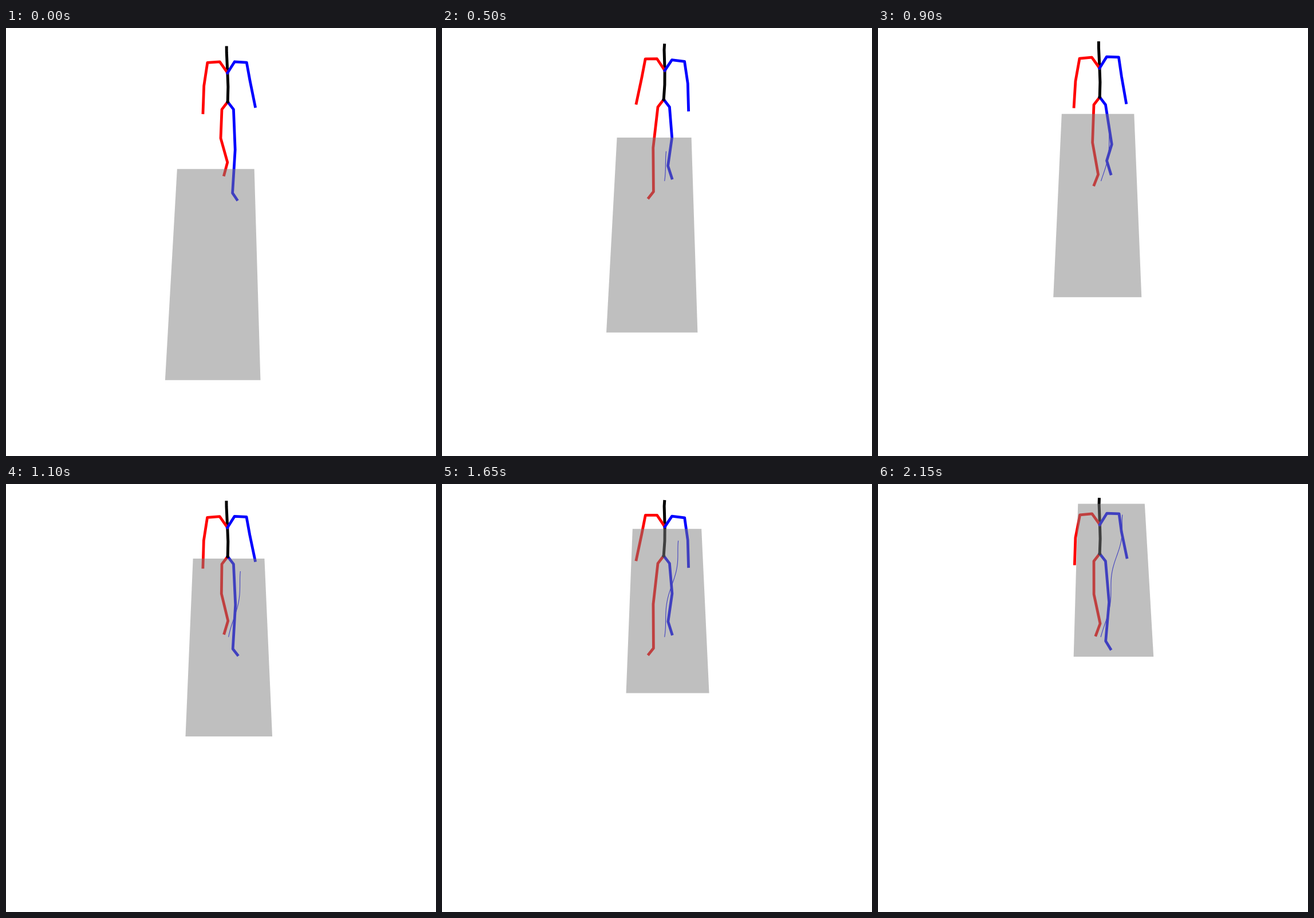
An HTML page with a canvas for the animation above (2.2 s loop, 751 px wide and 746 px high).

```html
<!DOCTYPE html>
<html lang="en">
<head>
<meta charset="utf-8">
<title>Walking figure</title>
<style>
html, body { margin: 0; width: 100%; height: 100%; overflow: hidden; background: #fff; }
canvas { display: block; }
</style>
</head>
<body>
<canvas id="stage" width="751" height="746"></canvas>
<script>
const ctx = document.getElementById('stage').getContext('2d');
const LOOP = 2200, STEP = 50, GAIT = 1140, CENTER = 387.2;
const RIGHT = -1, LEFT = 1;
const COLORS = { [RIGHT]: '#f00', [LEFT]: '#00f' };

const phaseAt = t => 2 * Math.PI * t / GAIT;

// mean + c1 cos p + s1 sin p + c2 cos 2p + s2 sin 2p + ...
const wave = (p, mean, ...coefs) => coefs.reduce((sum, c, i) => {
  const angle = p * (1 + (i >> 1));
  return sum + c * (i % 2 ? Math.sin(angle) : Math.cos(angle));
}, mean);

// The floor recedes steadily while the path drifts and sways.
const FLOOR_LENGTH = 1.221, FLOOR_HALF = 0.04315, ROOT_DEPTH = 6.297;
const depthAt = t => 6.403 + 0.000466 * t;
const sideAt = t => wave(phaseAt(t), -0.0158 + 0.00001316 * t, 0.002, -0.00094);

// Perspective: everything on the floor runs to one vanishing point.
function project(side, depth) {
  const scale = 1e4 / depth;
  return [387.8 + side * scale, scale - 1316];
}

function trace(points) {
  ctx.beginPath();
  points.forEach(p => ctx.lineTo(...p));
}
function line(color, points, width = 4.8) {
  trace(points);
  ctx.strokeStyle = color;
  ctx.lineWidth = width;
  ctx.stroke();
}

function drawTrail(t) {
  const points = [];
  for (let past = 0; past < t; past += STEP)
    points.push(project(sideAt(t) - sideAt(past), ROOT_DEPTH + depthAt(t) - depthAt(past)));
  if (points.length > 1) line('#00f', points, 1.1);
}

function drawFigure(t) {
  const phase = phaseAt(t);
  const rootY = wave(2 * phase, 125.5, 3.2, 4.6);
  const chestX = wave(phase, 388, 0, 1.8, 0, 0, -1.1);
  const headX = wave(phase, 386.9, 0.5, 3.2, 0, 0, -2.2);
  const tilt = wave(phase, 1.6, -1.75, 3.7);
  const splay = wave(phase, 0.7, -4.5);
  const root = [CENTER, rootY], chest = [chestX, rootY - 50.5];

  // Both sides share one motion, half a cycle apart and mirrored.
  const ownPhase = side => side === LEFT ? phase : phase + Math.PI;
  const joint = (side, out, down) => [CENTER + side * out, rootY + down];

  function drawLeg(side) {
    const p = ownPhase(side);
    line(COLORS[side], [
      root,
      joint(side, 10.2, 13.2),
      joint(side, splay / 2 + wave(p, 16.2, 0.4, -4.3, -1.7, 1.4),
        wave(p, 77, 10, 0.9, -3.5, -1.25)),
      joint(side, splay + wave(p, 8.2, 4, -4, 0, 0.7),
        wave(p, 124.2, 31.1, 20.7, 8, -11.9, -4.4, -3.5)),
      joint(side, splay + wave(p, 14.8, 4.9, -3.7, 0.2, -0.6),
        wave(p, 143.3, 26.9, 19.2, 5.5, -10.1, -5.4, -1.7))
    ]);
  }

  function drawArm(side) {
    const p = ownPhase(side);
    line(COLORS[side], [
      chest,
      [chestX - 0.6 + side * 13, chest[1] - 19.4 + side * tilt / 5],
      [chestX - 0.8 + (chestX - 387) / 2 + side * 34.2, chest[1] - 18 + side * tilt / 2],
      joint(side, wave(p, 40.2, -1.3, 1.8), wave(p, -31.9, -4.4, 3.1, -0.4, 1)),
      joint(side, wave(p, 45.6, 2.4), wave(p, 13.8, -5.5, 2.2, -0.3, 1.6))
    ]);
  }

  drawLeg(RIGHT);
  drawLeg(LEFT);
  line('#000', [
    root,
    [(CENTER + chestX) / 2 + 0.8, rootY - 26],
    chest,
    [(chestX + headX) / 2 - 0.8, rootY - 86.5],
    [headX, rootY - 94.7]
  ], 5);
  drawArm(RIGHT);
  drawArm(LEFT);
}

function drawFloor(t) {
  const side = sideAt(t), far = depthAt(t), near = far - FLOOR_LENGTH;
  trace([
    project(side - FLOOR_HALF, far), project(side + FLOOR_HALF, far),
    project(side + FLOOR_HALF, near), project(side - FLOOR_HALF, near)
  ]);
  ctx.fillStyle = 'rgba(128,128,128,.5)';
  ctx.fill();
}

function draw(elapsed) {
  const t = Math.floor(elapsed % LOOP / STEP) * STEP;
  ctx.clearRect(0, 0, 751, 746);
  ctx.lineJoin = 'round';
  ctx.lineCap = 'square';
  drawTrail(t);
  drawFigure(t);
  drawFloor(t);
}

let start;
function tick(now) {
  start ??= now;
  draw(now - start);
  requestAnimationFrame(tick);
}
draw(0);
requestAnimationFrame(tick);
</script>
</body>
</html>
```
